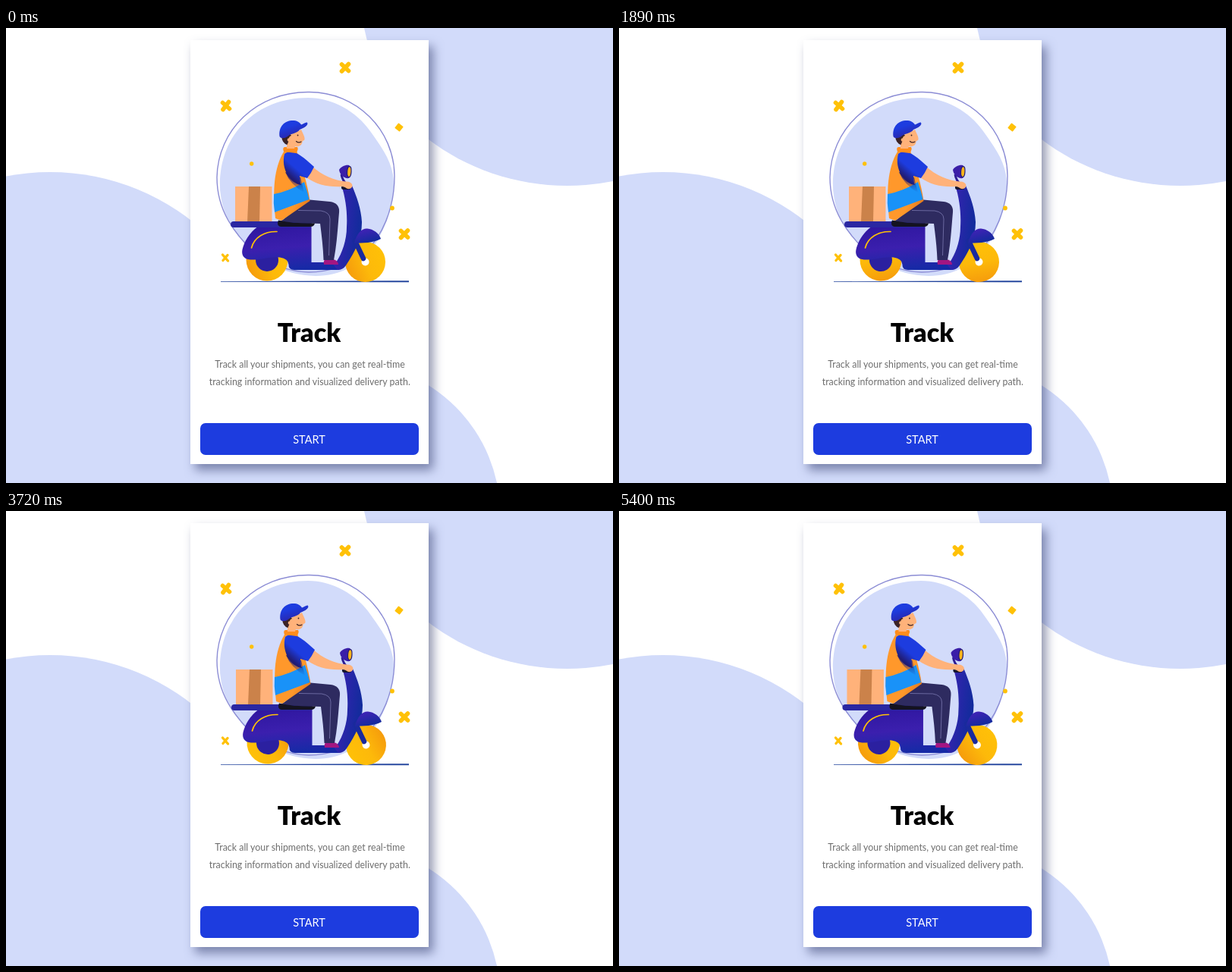
Recreate the animation shown at these times as an HTML page. Size 800x600 px, loop 5.43 s.

```html
<!DOCTYPE html>
<html lang="en">
<head>
<meta charset="utf-8">
<title>Track</title>
<style>
  html, body { margin: 0; width: 100%; height: 100%; overflow: hidden; background: #fff; }
  svg { display: block; width: 100%; height: 100%; }
  text { font-family: Lato, "Open Sans", sans-serif; text-anchor: middle; }
  .title { font-size: 34px; font-weight: 900; }
  .copy { font-size: 12.4px; fill: #6e6e6e; }
  .start { font-size: 14.5px; fill: #fff; }
  .card { filter: drop-shadow(6px 8px 7px rgba(40, 50, 100, .52)); }
</style>
</head>
<body>
<svg viewBox="0 0 800 600">
  <defs>
    <clipPath id="window"><rect x="243" y="16" width="314" height="559"/></clipPath>
    <linearGradient id="tyre" x1="0" y1=".7" x2="1" y2=".3">
      <stop offset="0" stop-color="#f59a0c"/><stop offset=".5" stop-color="#fdb90a"/><stop offset="1" stop-color="#ffc107"/>
    </linearGradient>
    <linearGradient id="hull" x1=".3" y1="0" x2=".5" y2="1">
      <stop offset="0" stop-color="#2f17a0"/><stop offset=".5" stop-color="#3b1fae"/><stop offset="1" stop-color="#162aa6"/>
    </linearGradient>
    <linearGradient id="shield" x1="0" y1="0" x2="1" y2=".3">
      <stop offset="0" stop-color="#4420b8"/><stop offset="1" stop-color="#122b9c"/>
    </linearGradient>
    <linearGradient id="fender" x1="0" y1="0" x2=".5" y2="1">
      <stop offset="0" stop-color="#4a20bb"/><stop offset="1" stop-color="#122b9c"/>
    </linearGradient>
    <linearGradient id="cap" x1="0" y1="0" x2=".5" y2="1">
      <stop offset=".4" stop-color="#1d3cdf"/><stop offset="1" stop-color="#2a23a6"/>
    </linearGradient>
    <linearGradient id="sleeve" x1=".8" y1=".3" x2=".25" y2="1">
      <stop offset=".45" stop-color="#1d3cdf"/><stop offset=".8" stop-color="#211c74"/>
    </linearGradient>
    <linearGradient id="vest" x1=".2" y1=".5" x2=".75" y2="1">
      <stop offset=".6" stop-color="#ff982b"/><stop offset="1" stop-color="#e47a1c"/>
    </linearGradient>
    <linearGradient id="shade" x1="0" y1="0" x2="0" y2="1">
      <stop offset="0" stop-color="#211c74"/><stop offset="1" stop-color="#211c74" stop-opacity="0"/>
    </linearGradient>
  </defs>

  <g fill="#d2dbfa">
    <circle cx="58" cy="493" r="303"/>
    <circle cx="450" cy="642" r="201.5"/>
    <path d="M472 0C487 70 520 118 557 147C605 184 670 208 740 208Q770 208 800 202V0Z"/>
  </g>
  <rect class="card" x="243" y="16" width="314" height="559" fill="#fff"/>

  <path fill="#d2dbfa" d="M398 92C430 92 462 110 480 136C494 156 510 176 511 203C512 235 500 262 488 283C470 312 440 327 408 327C365 326 335 305 320 290C298 268 282 240 282 207C282 140 330 92 398 92Z"/>
  <path fill="none" stroke="#8c8dd5" stroke-width="1.4" d="M399 84.5C462 84 512 135 512 195C512 238 496 275 472 297C448 315 425 322 399 322C372 321 348 312 328 297C300 270 278 240 278 197C279 135 330 84 399 84.5Z"/>

  <g fill="none" stroke="#ffc107" stroke-width="5.6" stroke-linecap="round">
    <path d="M442.5 48L451.5 56.5M451.5 47.5L442.5 57"/>
    <path d="M285.5 98.5L294.5 106.5M293.5 97.5L286 107.5"/>
    <path d="M520.5 267.5L529.5 276M529.5 267L520.5 276.5"/>
    <path stroke-width="3.4" d="M285.5 299L292.5 307M292 299.5L286 306.5"/>
  </g>
  <g fill="#ffc107">
    <rect x="-4.2" y="-4.2" width="8.4" height="8.4" rx="1" transform="translate(518 131) rotate(38)"/>
    <circle cx="323.7" cy="179" r="2.7"/>
    <circle cx="509" cy="237.5" r="2.9"/>
  </g>
  <path fill="#27489f" d="M283 334L531 333.2V335.3L283 334.8Z"/>

  <g clip-path="url(#window)">
    <g id="ride">
      <g transform="translate(345 306)"><g class="wheel">
        <circle r="27.5" fill="url(#tyre)"/><circle r="15" fill="#2b20a0"/>
      </g></g>
      <g transform="translate(474.5 308.5)"><g class="wheel">
        <circle r="26.5" fill="url(#tyre)"/><circle r="5" fill="#fff"/>
      </g></g>

      <g id="body">
        <rect x="303" y="209" width="48.5" height="47" fill="#ffb27a"/>
        <path fill="#cb824a" d="M321 209H336L335 256H319Z"/>
        <path fill="url(#hull)" d="M334 261H403.5V309H440V319H381Q373 319 373.5 312Q373 304 362 302.5C348 301 338 306 323 305.5C314 305 311 299 312.5 292C315 282 321 270 334 261Z"/>
        <rect x="297" y="255" width="107" height="8" rx="4" fill="#2a27a2"/>
        <path fill="none" stroke="#ffc107" stroke-width="1.7" stroke-linecap="round" d="M324.5 290C328 276 342 268 358 268.5"/>
        <path fill="url(#shield)" d="M443 207L457 208C463 222 469 238 470 256C470 278 461 295 449 313Q445 319 438 319L430 309H436C444 297 450 280 450 262C451 244 449 226 443 207Z"/>
        <path stroke="#1a2a9c" stroke-width="6.5" stroke-linecap="round" d="M461 281L472 304"/>
        <path fill="url(#fender)" d="M460 284C463 271 470 264 477 264.5C485 265 493 271 495 278C484 284 472 283 460 284Z"/>
        <path fill="none" stroke="#2c1c93" stroke-width="3" d="M443 193Q444 201 452 209"/>
        <path fill="#3a1ea8" d="M440 187C442 183 449 180 453 181C457 183 457 194 453 198C447 199 441 194 440 187Z"/>
        <ellipse cx="453.3" cy="189.5" rx="2.7" ry="7" fill="#ffb51a" stroke="#211c74" stroke-width="1.2" transform="rotate(4 453 189)"/>
        <rect x="443" y="207" width="12" height="6" rx="2.5" fill="#15142e"/>
      </g>

      <g id="rider">
        <path fill="#a31682" d="M421 305.5H434Q439 308 439 312H420Q419 308 421 305.5Z"/>
        <path fill="#2e2b60" d="M361 255C374 252 384 227 401 226.5L428 229Q441 231 440 243C438 266 437 285 433 306H419.5C419 290 417 274 415 258L385 257Z"/>
        <path fill="none" stroke="#7270a8" stroke-width=".9" d="M386 240.5L416 241Q428 243 428 252L426.5 300"/>
        <path fill="#141320" d="M360 253.5Q378 258 408 257.5Q407 262 402 262H363Q357 261 360 253.5Z"/>
        <path fill="url(#vest)" d="M367 163L384 162C392 185 398 205 401.5 228L364 254L356 251C352 215 354 185 367 163Z"/>
        <path fill="#1992f8" d="M354 219Q375 215 394 203Q398 215 400.5 226L355 243Q353 231 354 219Z"/>
        <path fill="url(#shade)" d="M369 190L389 197L394 217Q376 207 369 190Z"/>
        <path fill="#ffb27a" d="M404 182C418 195 434 201 449 202.5C458 202 460 210 454 212C450 213 448 209 444 209C427 210 410 207 397 197Z"/>
        <path fill="url(#sleeve)" d="M368 166C377 158 389 166 407 183Q403 192 398 198L388 195Q388 203 390 207C375 205 363 185 368 166Z"/>
        <path fill="#ff8d1c" d="M368 157H385Q387 160 383 165L367 163Q365 158 368 157Z"/>
        <path fill="#ffb27a" d="M371 143L390 134C392 139 395 143 394.5 147C394 149 392 148 391.5 150C391 155 387 157 382 156L381 159H371Z"/>
        <path fill="#3b2326" d="M364 143L375 139L377 142Q373 143 374 148L371.5 154Q365 152 364 143Z"/>
        <circle cx="374" cy="147.5" r="2.3" fill="#ffb27a"/>
        <circle cx="385.5" cy="141.5" r=".9" fill="#3b2326"/>
        <path fill="none" stroke="#3b2326" stroke-width="1.2" stroke-linecap="round" d="M383.5 149.5Q386.5 152 390 150"/>
        <path fill="url(#cap)" d="M361.5 143C360 130 368 122 379 122C384 122 388 124 390 127.5C393 127 396 123.5 398 124.8C400 128 394 132 388 134C385 139 376 139 372 143C368 146 363 146 361.5 143Z"/>
      </g>
    </g>
  </g>

  <text class="title" x="399.5" y="413.5">Track</text>
  <text class="copy" x="400.5" y="448">Track all your shipments, you can get real-time</text>
  <text class="copy" x="400.3" y="470.5">tracking information and visualized delivery path.</text>
  <rect x="256" y="521" width="288" height="42" rx="7" fill="#1d3cdf"/>
  <text class="start" x="399.5" y="547.8">START</text>
</svg>
<script>
  const LOOP = 5430, BEAT = 1140, TURNS = 8;
  const EXIT = 3720, ENTER = 4860, SLIDE = 620, REACH = 267;
  const $ = id => document.getElementById(id);
  const ride = $("ride"), body = $("body"), rider = $("rider");
  const wheels = document.querySelectorAll(".wheel");
  const clamp = v => Math.min(1, Math.max(0, v));
  const move = (el, x, y) => el.setAttribute("transform", `translate(${x.toFixed(2)} ${y.toFixed(2)})`);

  // cubic-bezier(.33, 0, .2, 1), solved by bisection.
  function ease(p) {
    let low = 0, high = 1;
    for (let i = 0; i < 24; i++) {
      const u = (low + high) / 2, v = 1 - u;
      if (.99 * u * v * v + .6 * u * u * v + u ** 3 < p) low = u;
      else high = u;
    }
    return low * low * (3 - 2 * low);
  }
  const slide = time => ease(clamp(time / SLIDE));

  // Arrival wraps over the loop's seam.
  function rideX(t) {
    if (t < EXIT) return REACH * (slide(t + LOOP - ENTER) - 1);
    if (t < ENTER) return REACH * slide(t - EXIT);
    return REACH * (slide(t - ENTER) - 1);
  }

  // One soft bump in the road per beat.
  function hop(t, height, start, time) {
    if (t >= 3 * BEAT) return 0;
    const p = clamp((t % BEAT - start) / time);
    return -height * Math.sin(Math.PI * p) ** 2;
  }

  function draw(now) {
    const t = now % LOOP;
    move(ride, rideX(t), 0);
    move(body, 0, hop(t, 5, 290, 270));
    move(rider, 0, hop(t, 5.5, 305, 305));
    const angle = (360 * TURNS * t / LOOP).toFixed(1);
    wheels.forEach(w => w.setAttribute("transform", `rotate(${angle})`));
  }

  let begin;
  function tick(now) {
    begin ??= now;
    draw(now - begin);
    requestAnimationFrame(tick);
  }
  draw(0);
  requestAnimationFrame(tick);
</script>
</body>
</html>
```
